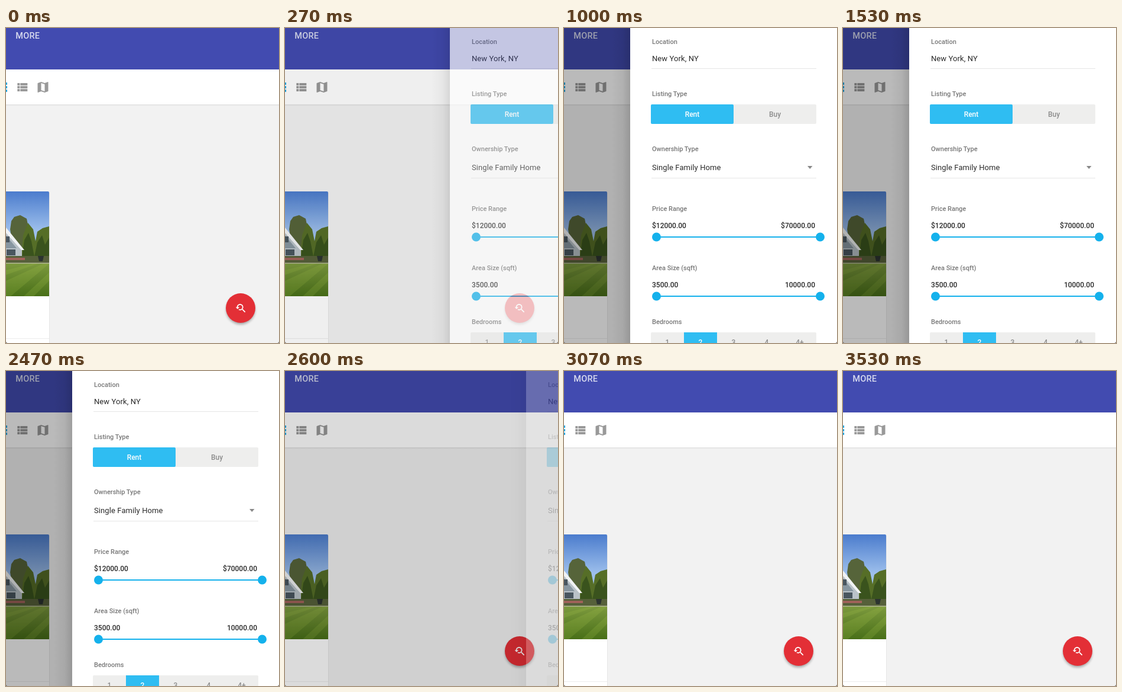
Recreate the animation shown at these times as an HTML page. Size 462x532 px, loop 3590 ms.

```html
<!DOCTYPE html>
<html lang="en">
<head>
<meta charset="utf-8">
<title>Property filter drawer</title>
<style>
html, body { margin: 0; width: 100%; height: 100%; overflow: hidden; background: #f2f2f2; }
svg { display: block; width: 462px; height: 532px; font-family: Roboto, sans-serif; }
.label { font-size: 11px; font-weight: 500; fill: #777; }
.field { font-size: 13px; letter-spacing: .1px; fill: #2b2b2b; }
.value { font-size: 12px; font-weight: 500; fill: #2b2b2b; }
.tab { font-size: 12px; font-weight: 500; fill: #8c8c8c; text-anchor: middle; }
.on { fill: #fff; }
</style>
</head>
<body>
<svg viewBox="0 0 462 532">
  <defs>
    <linearGradient id="sky" x1="0" y1="0" x2="0" y2="1">
      <stop offset="0" stop-color="#4b7ccd"/><stop offset=".6" stop-color="#9dbfec"/>
    </linearGradient>
    <linearGradient id="lawn" x1="0" y1="0" x2="0" y2="1">
      <stop offset="0" stop-color="#7d9a3e"/><stop offset="1" stop-color="#486f18"/>
    </linearGradient>
    <linearGradient id="drop" x1="0" y1="0" x2="0" y2="1">
      <stop offset="0" stop-color="#000" stop-opacity=".08"/><stop offset="1" stop-color="#000" stop-opacity="0"/>
    </linearGradient>
    <linearGradient id="edge">
      <stop offset="0" stop-color="#000" stop-opacity="0"/>
      <stop offset=".6" stop-color="#000" stop-opacity=".05"/>
      <stop offset="1" stop-color="#000" stop-opacity=".15"/>
    </linearGradient>
    <filter id="soft" x="-30%" y="-30%" width="160%" height="160%"><feGaussianBlur stdDeviation="2"/></filter>
    <clipPath id="photo"><path d="M0 276H71a2 2 0 0 1 2 2V453H0z"/></clipPath>
  </defs>

  <rect width="462" height="532" fill="#f2f2f2"/>
  <rect width="462" height="70" fill="#424bb0"/>
  <text x="16.300" y="18" font-size="14.500" font-weight="500" letter-spacing=".2" fill="#d6d9ee">MORE</text>
  <rect y="70" width="462" height="59" fill="#fff"/>
  <rect y="129" width="462" height="3" fill="url(#drop)"/>
  <path d="M0 92h2v4H0zM0 98h2v4H0zM0 104h2v4H0z" fill="#29a9e1"/>
  <g fill="#999">
    <path transform="translate(15.3 88)" d="M4 5h4v4H4zM4 10h4v4H4zM4 15h4v4H4zM9 5h12v4H9zM9 10h12v4H9zM9 15h12v4H9z"/>
    <path transform="translate(50.5 88)" fill-rule="evenodd" d="M20.5 3 15 5.1 9 3 3.4 4.9 3 5.4V20.5l.5.5L9 18.9l6 2.1 5.6-1.9.4-.5V3.5zM15 19l-6-2.1V5l6 2.1z"/>
  </g>

  <rect x="-9" y="277" width="83" height="270" rx="2" fill="#000" opacity=".05"/>
  <rect x="-9" y="276" width="82" height="270" rx="2" fill="#fff"/>
  <g clip-path="url(#photo)">
    <rect y="276" width="73" height="110" fill="url(#sky)"/>
    <path d="M7 340 9 326 14 319 24 316 35 322 37 332 32 345 34 384H14z" fill="#56643a"/>
    <path d="M26 388 29 350 37 329 46 340 50 360 53 344 62 338 73 335V392z" fill="#566e27"/>
    <path d="M27 386 31 358 38 346 43 360 48 386zM48 386 53 362 61 350 66 366 73 354V390z" fill="#3a531d"/>
    <path d="M0 343 27 374V394H0z" fill="#b9c2c8"/>
    <path d="M0 350 18 372H0z" fill="#8796a0"/>
    <path d="M0 337 31 375H26L0 346z" fill="#f1f3f4"/>
    <path d="M0 352h6v10H0zM1 374h15v10H1z" fill="#49565f"/>
    <path d="M0 385H73V398H0z" fill="#56603a"/>
    <path d="M0 388h32v4H0z" fill="#a0625a"/>
    <path d="M54 385h10l-2 9h-6z" fill="#2c3330"/>
    <rect y="397" width="73" height="56" fill="url(#lawn)"/>
    <path d="M0 396.500H73V398H0z" fill="#b4ba94"/>
    <g fill="#a6c44c" opacity=".2">
      <path d="M0 409 45 398h9L0 417z"/><path d="M0 427 63 398h10L8 453H0z"/><path d="M30 453 73 413v14L47 453z"/>
    </g>
  </g>
  <path d="M0 524.500H73" stroke="#ececec"/>

  <circle cx="397" cy="476" r="24.500" fill="#000" opacity=".32" filter="url(#soft)"/>
  <circle cx="397" cy="473" r="25" fill="#e32f36"/>
  <path transform="translate(387 463.500) scale(.83)" fill="#fff" d="M17 14h-.8l-.3-.3c1-1.100 1.600-2.600 1.600-4.200C17.500 5.900 14.600 3 11 3S4.500 6 4.500 9.500H2l3.800 4 4.200-4H6.500C6.500 7 8.500 5 11 5s4.500 2 4.500 4.500S13.500 14 11 14c-.6 0-1.200-.1-1.800-.4l-1.500 1.500c1 .6 2.100.9 3.300.9 1.600 0 3.100-.6 4.200-1.600l.3.3v.8l5 5L22 19z"/>

  <rect id="shade" width="462" height="532"/>
  <g id="panel"></g>
  <path d="M0 529.500V532H2.500Q.4 531.600 0 529.500M462 529.500V532H459.500Q461.600 531.600 462 529.500" fill="#666"/>
</svg>
<script>
const LOOP = 3590, STEP = 200 / 3;
const WIDTH = 350, RIGHT = 462;
const OPEN = { at: 200, slide: 400, fade: 280 };
const CLOSE = { at: 2467, slide: 372, fade: 280 };
const SHADE = 0.27;
const BLUE = '#2fbdf2', KNOB = '#14b1ec', GREY = '#eeeeed';

const panel = document.getElementById('panel');
const shade = document.getElementById('shade');

// Panel contents, measured from the panel's left edge
const text = (cls, x, y, s, extra = '') => `<text class="${cls}" x="${x}" y="${y}" ${extra}>${s}</text>`;
const label = (y, s) => text('label', 37, y, s);
const rule = y => `<path d="M36 ${y}H315" stroke="#e6e6e6"/>`;

function tabs(y, h, base, names, active) {
  const w = 280 / names.length;
  const box = (x, wide, fill, rx) => `<rect x="${x}" y="${y}" width="${wide}" height="${h}" rx="${rx}" fill="${fill}"/>`;
  return box(35, 280, GREY, 2) + box(35 + active * w, w, BLUE, active ? 0 : 2) +
    names.map((s, i) => text(i === active ? 'tab on' : 'tab', 35 + (i + 0.5) * w, base, s)).join('');
}

function slider(y, name, low, high) {
  const knob = x => `<circle cx="${x}" cy="${y}" r="7.5" fill="${KNOB}"/>`;
  return label(y - 44, name) + text('value', 37, y - 15, low) +
    text('value', 313, y - 15, high, 'text-anchor="end"') +
    `<path d="M44 ${y}H321" stroke="${KNOB}" stroke-width="2"/>` + knob(44.5) + knob(321.5);
}

panel.innerHTML =
  '<rect x="-32" width="32" height="532" fill="url(#edge)"/>' +
  `<rect width="${WIDTH + 20}" height="532" fill="#fff"/>` +
  label(27, 'Location') + text('field', 37, 56, 'New York, NY') + rule(68.5) +
  label(115, 'Listing Type') + tabs(129, 33, 150, ['Rent', 'Buy'], 0) +
  label(208, 'Ownership Type') + text('field', 37, 240, 'Single Family Home') +
  '<path d="M300 233h8.500l-4.250 5z" fill="#888"/>' + rule(253.5) +
  slider(353, 'Price Range', '$12000.00', '$70000.00') +
  slider(453, 'Area Size (sqft)', '3500.00', '10000.00') +
  label(500, 'Bedrooms') + tabs(514, 33, 535, ['1', '2', '3', '4', '4+'], 1);

const clamp = v => Math.min(1, Math.max(0, v));

// cubic-bezier(.25, .8, .25, 1)
function swift(u) {
  if (u <= 0 || u >= 1) return clamp(u);
  let lo = 0, hi = 1, s = 0.5;
  const at = (a, b) => 3 * (1 - s) * (1 - s) * s * a + 3 * (1 - s) * s * s * b + s * s * s;
  for (let i = 0; i < 24; i++) {
    s = (lo + hi) / 2;
    if (at(0.25, 0.25) < u) lo = s; else hi = s;
  }
  return at(0.8, 1);
}

function render(ms) {
  const t = Math.floor((ms % LOOP + 5) / STEP) * STEP;
  const part = (phase, key) => clamp((t - phase.at) / phase[key]);
  const shown = swift(part(OPEN, 'slide')) - swift(part(CLOSE, 'slide'));
  const dim = part(OPEN, 'fade') - part(CLOSE, 'fade');
  // The panel turns solid a little ahead of its slide
  const solid = 1 - Math.pow(1 - shown, 1.6);
  panel.setAttribute('transform', `translate(${Math.floor(RIGHT - WIDTH * shown)} 0)`);
  panel.setAttribute('opacity', solid.toFixed(3));
  panel.setAttribute('visibility', shown > 0 ? 'visible' : 'hidden');
  shade.setAttribute('opacity', (SHADE * dim).toFixed(3));
}

const start = performance.now();
function tick() {
  render(performance.now() - start);
  requestAnimationFrame(tick);
}
tick();
</script>
</body>
</html>
```
